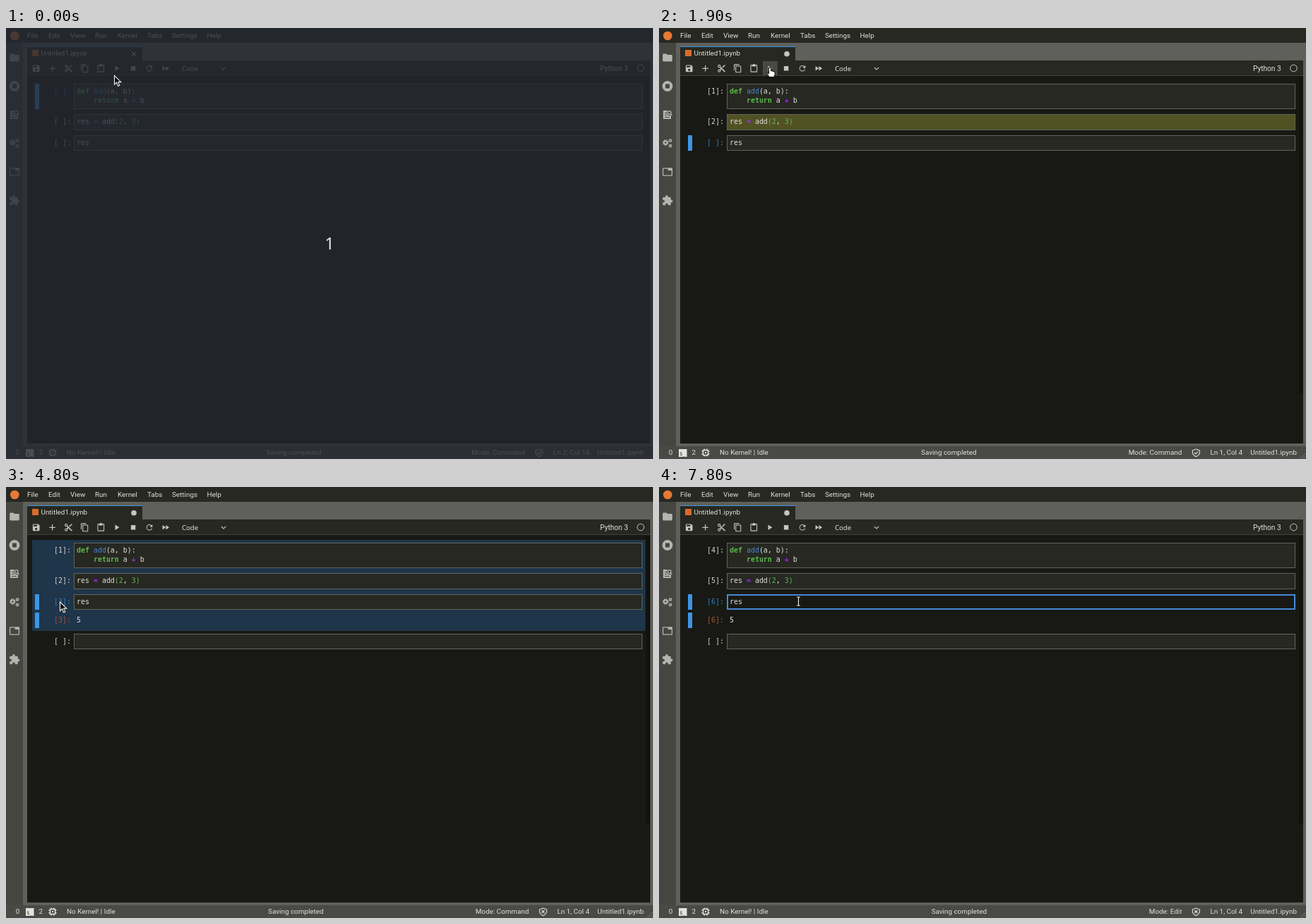
An HTML page with a canvas that plays this animation: 916 by 611 pixels, repeating every 8000 ms.

```html
<!DOCTYPE html>
<html lang="en">
<head>
<meta charset="utf-8">
<title>Notebook cell flash</title>
<style>
  html, body { margin: 0; width: 100%; height: 100%; overflow: hidden; background: #181914; }
  canvas { display: block; }
</style>
</head>
<body>
<canvas id="stage" width="916" height="611"></canvas>
<script>
const ctx = document.getElementById('stage').getContext('2d');
const LOOP = 8000, STEP = 100, FLASH_MS = 600;

const UI = '9.9px Roboto, sans-serif';
const MONO = '9.95px "DejaVu Sans Mono", monospace';
const MONO_BOLD = 'bold ' + MONO;

const C = {
  panel: '#272822', page: '#181914', side: '#454640', strip: '#5f605b', status: '#494a45',
  border: '#62635d', text: '#e0e0dc', icon: '#c6c6c1', blue: '#3d95e5', focus: '#4789d6',
  prompt: '#d6d6d1', activePrompt: '#307fc1', outPrompt: '#a5563c', selected: '#1f3549',
  keyword: '#5cb84c', name: '#4a86cf', operator: '#9a2be8', number: '#5fb552'
};

// 24-unit icon outlines
const ICONS = {
  folder: 'M10 4H4a2 2 0 0 0-2 2v12a2 2 0 0 0 2 2h16a2 2 0 0 0 2-2V8a2 2 0 0 0-2-2h-8z',
  running: 'M12 2a10 10 0 1 0 0 20a10 10 0 0 0 0-20zM8 8h8v8H8z',
  tabs: 'M21 3H3a2 2 0 0 0-2 2v14a2 2 0 0 0 2 2h18a2 2 0 0 0 2-2V5a2 2 0 0 0-2-2zM21 19H3V5h10v4h8z',
  puzzle: 'M20.5 11H19V7a2 2 0 0 0-2-2h-4V3.5a2.5 2.5 0 0 0-5 0V5H4a2 2 0 0 0-2 2v3.8h1.5a2.7 2.7 0 0 1 0 5.4H2V20a2 2 0 0 0 2 2h3.8v-1.5a2.7 2.7 0 0 1 5.4 0V22H17a2 2 0 0 0 2-2v-4h1.5a2.5 2.5 0 0 0 0-5z',
  save: 'M17 3H5a2 2 0 0 0-2 2v14a2 2 0 0 0 2 2h14a2 2 0 0 0 2-2V7zM12 19a3 3 0 1 1 0-6a3 3 0 0 1 0 6zM15 9H5V5h10z',
  add: 'M19 13h-6v6h-2v-6H5v-2h6V5h2v6h6z',
  cut: 'M9.6 7.6A4 4 0 1 0 7.6 9.6L10 12l-2.4 2.4A4 4 0 1 0 9.6 16.4L12 14l7 7h3v-1zM6 8a2 2 0 1 1 0-4a2 2 0 0 1 0 4zM6 20a2 2 0 1 1 0-4a2 2 0 0 1 0 4zM19 3l-6 6 2 2 7-7V3z',
  copy: 'M16 1H4a2 2 0 0 0-2 2v14h2V3h12zM19 5H8a2 2 0 0 0-2 2v14a2 2 0 0 0 2 2h11a2 2 0 0 0 2-2V7a2 2 0 0 0-2-2zM19 21H8V7h11z',
  paste: 'M19 2h-4.2a3 3 0 0 0-5.6 0H5a2 2 0 0 0-2 2v16a2 2 0 0 0 2 2h14a2 2 0 0 0 2-2V4a2 2 0 0 0-2-2zM19 20H5V4h2v3h10V4h2z',
  run: 'M7 5v14l11-7z',
  stop: 'M6 6h12v12H6z',
  restart: 'M17.7 6.3A8 8 0 1 0 19.7 14h-2.1A6 6 0 1 1 12 6a6 6 0 0 1 4.2 1.8L13 11h7V4z',
  runAll: 'M4 18l8.5-6L4 6zM13 6v12l8.5-6z'
};
for (const key in ICONS) ICONS[key] = new Path2D(ICONS[key]);

const ARROW = new Path2D('M0 0V12.6L3 9.8L5.1 14.8L7.3 13.9L5.2 9.1H9.3Z');
const HAND = new Path2D('M-1.5 1.2Q-1.5 0 0 0Q1.5 0 1.5 1.2V4.6L5.4 5.4Q7.2 5.8 7.2 7.4V9.6L5.8 13.6H-.8L-4 9.4Q-4.6 7.6-3 7.6L-1.5 8.6Z');

// [start, x, y, shape]
const POINTER = [
  [0, 153.5, 67.5, 'arrow'], [400, 155.5, 65.5, 'arrow'], [500, 156.5, 63, 'arrow'],
  [600, 157, 59, 'hand'], [700, 157, 56, 'hand'], [3100, 142, 70, 'arrow'],
  [3200, 106.5, 84.5, 'arrow'], [3300, 88, 88, 'arrow'], [3400, 77, 91, 'arrow'],
  [3500, 73, 93, 'arrow'], [3800, 74.5, 131.5, 'arrow'], [4000, 69.5, 145.5, 'arrow'],
  [4300, 67.5, 159, 'arrow'], [4800, 76.5, 163, 'arrow'], [4900, 88, 147, 'arrow'],
  [5000, 118, 113, 'arrow'], [5100, 150, 83, 'arrow'], [5200, 163.5, 76.5, 'arrow'],
  [5400, 161, 64, 'hand'], [5500, 159.5, 55, 'hand'], [6500, 163.5, 64.5, 'arrow'],
  [6600, 187.5, 106.5, 'beam'], [6800, 203, 131, 'beam'], [6900, 200, 113, 'beam'],
  [7100, 204, 130, 'beam'], [7200, 200, 148, 'beam'], [7300, 197.5, 162, 'beam']
];

// [start, active cell, edit mode, cursor position, prompt numbers]
const STATES = [
  [0, 0, false, 'Ln 2, Col 14', ' ', ' ', ' '],
  [900, 1, false, 'Ln 1, Col 16', '1', ' ', ' '],
  [1500, 2, false, 'Ln 1, Col 4', '1', '2', ' '],
  [2400, 3, true, 'Ln 1, Col 1', '1', '2', '3'],
  [3700, 0, false, 'Ln 2, Col 14', '1', '2', '3'],
  [4300, 2, false, 'Ln 1, Col 4', '1', '2', '3'],
  [5700, 3, false, 'Ln 1, Col 1', '4', '5', '6'],
  [7500, 2, true, 'Ln 1, Col 4', '4', '5', '6']
];

const CELLS = [
  { y: 79, h: 36, base: 93.3, runs: [870, 5700] },
  { y: 122, h: 23, base: 136, runs: [1480, 5775] },
  { y: 152, h: 22, base: 165.8, runs: [2410, 5775] },
  { y: 208, h: 22, base: 221.6, runs: [] }
];

const at = (keys, t) => keys.filter(k => k[0] <= t).pop();
const within = (t, from, to) => t >= from && t < to;

function box(x, y, w, h, color) {
  ctx.fillStyle = color;
  ctx.fillRect(x, y, w, h);
}

function disc(x, y, r, color) {
  ctx.fillStyle = color;
  ctx.beginPath();
  ctx.arc(x, y, r, 0, 7);
  ctx.fill();
}

function text(str, x, y, color = C.text, font = UI, align = 'left') {
  ctx.font = font;
  ctx.fillStyle = color;
  ctx.textAlign = align;
  ctx.fillText(str, x, y);
  return ctx.measureText(str).width;
}

function stroke(path, color, width = 1, x = 0, y = 0) {
  ctx.save();
  ctx.translate(x, y);
  ctx.strokeStyle = color;
  ctx.lineWidth = width;
  ctx.stroke(new Path2D(path));
  ctx.restore();
}

function icon(name, x, y, scale, color = C.icon) {
  ctx.save();
  ctx.translate(x, y);
  ctx.scale(scale, scale);
  ctx.translate(-12, -12);
  ctx.fillStyle = color;
  ctx.fill(ICONS[name], 'evenodd');
  ctx.restore();
}

function gear(x, y, r, color) {
  ctx.strokeStyle = color;
  ctx.lineWidth = r * 0.6;
  ctx.beginPath();
  ctx.arc(x, y, r * 0.7, 0, 7);
  ctx.stroke();
  ctx.setLineDash([r * 0.4, r * 0.385]);
  ctx.beginPath();
  ctx.arc(x, y, r, 0, Math.PI * 2);
  ctx.stroke();
  ctx.setLineDash([]);
}

// Parts are [string, color, font]
function code(parts, y) {
  let x = 100;
  for (const [str, color = C.text, font = MONO] of parts) x += text(str, x, y, color, font);
}

function drawFrame() {
  box(0, 0, 916, 611, C.strip);
  box(0, 0, 916, 21, C.panel);
  box(0, 21, 24, 572, C.side);
  box(30, 46, 882, 22, C.panel);
  box(30, 67, 882, 1, '#41423c');
  box(30, 68, 882, 521, C.page);
  box(0, 593, 916, 18, C.status);
  disc(12.3, 11, 6.3, '#e57a35');
  const menu = { File: 30, Edit: 60, View: 91, Run: 126, Kernel: 158, Tabs: 200, Settings: 235, Help: 284.5 };
  for (const name in menu) text(name, menu[name], 13.9);
}

function drawSidebar() {
  const color = '#b4b5b0';
  icon('folder', 12, 42, 0.68, color);
  icon('running', 12, 82.5, 0.74, color);
  box(6, 117, 11, 12, color);
  stroke('M8 120.5H12M8 123.5H11M8 126.5H15', C.side, 1.2);
  disc(15, 120, 4, C.side);
  stroke('M17 120a2.3 2.3 0 1 1-4.6 0a2.3 2.3 0 0 1 4.6 0M16.5 121.7L18.5 124', color, 1.3);
  gear(9.3, 162.5, 3.3, color);
  gear(16, 159.5, 2, color);
  gear(16, 167, 2, color);
  icon('tabs', 12, 204, 0.64, color);
  icon('puzzle', 12, 244.5, 0.68, color);
}

function drawTab(dirty) {
  box(30, 26, 163, 20, C.panel);
  box(30, 26, 163, 1, C.blue);
  box(37, 31, 9, 9, '#d86c2c');
  text('Untitled1.ipynb', 49.5, 38.5);
  if (dirty) disc(181, 36.7, 3.8, C.icon);
  else stroke('M177.8 33.3L184.4 39.9M184.4 33.3L177.8 39.9', C.icon, 1.1);
}

function drawToolbar(hover) {
  if (hover) box(147, 47, 21, 20, '#484943');
  const tools = ['save', 'add', 'cut', 'copy', 'paste', 'run', 'stop', 'restart', 'runAll'];
  tools.forEach((name, i) => icon(name, 42.7 + i * 22.9, 57.3, i === 1 ? 0.6 : 0.54));
  text('Code', 249, 60.5, C.text, '9.6px "Noto Sans", sans-serif');
  stroke('M304.8 55.8L308 59L311.2 55.8', C.icon, 1.2);
  text('Python 3', 841, 61, C.text, '10.1px Roboto, sans-serif');
  stroke('M903.3 57a4.8 4.8 0 1 1-9.6 0a4.8 4.8 0 0 1 9.6 0', C.icon);
}

function drawStatus(edit, position, trusted) {
  const y = 605.2;
  text('0', 13.7, y);
  box(28, 597, 11.5, 11, '#e4e4df');
  text('$_', 29, 605.5, '#40413b', '7px "DejaVu Sans Mono", monospace');
  text('2', 46.5, y);
  stroke('M62.5 598.5h7v7h-7zM64.3 596.5v2M67.7 596.5v2M64.3 605.5v2M67.7 605.5v2M60.5 600.3h2M60.5 603.7h2M69.5 600.3h2M69.5 603.7h2', '#e4e4df', 1.4);
  box(65, 601, 2, 2, '#e4e4df');
  text('No Kernel! | Idle', 86, y);
  text('Untitled1.ipynb', 903, y, C.text, UI, 'right');
  const shield = 826 - text(position, 826, y, C.text, UI, 'right') - 20;
  const mark = trusted ? 'M-2.4 0L-.6 1.8L2.6-1.6' : 'M-2-2L2 2M2-2L-2 2';
  stroke('M0-5L5-3.2V0Q4.6 3.8 0 5.6Q-4.6 3.8-5 0V-3.2Z' + mark, C.text, 1.15, shield, 602);
  const mode = 'Mode: ' + (edit ? 'Edit' : 'Command');
  const left = shield - 20 - text(mode, shield - 20, y, C.text, UI, 'right');
  text('Saving completed', (left + 156) / 2, y, C.text, UI, 'center');
  stroke('M908 610.5L915.5 603M912 610.5L915.5 607', '#85867f', 0.8);
}

function drawPrompt(number, base, color) {
  text(`[${number}]:`, 92, base, color, MONO, 'right');
}

function drawCell(index, t, active, edit, number) {
  const { y, h, base, runs } = CELLS[index];
  const editing = active && edit;
  if (active) box(41, y, 6, h, C.blue);
  box(96, y, 805, h, editing ? C.page : C.panel);
  const start = runs.find(r => within(t, r, r + FLASH_MS));
  if (start !== undefined) {
    box(96, y, 805, h, C.page);
    box(96, y, 805, h, `rgba(208, 214, 70, ${1 - (t - start) / FLASH_MS})`);
  }
  ctx.strokeStyle = editing ? C.focus : C.border;
  ctx.lineWidth = editing ? 2 : 1;
  const inset = ctx.lineWidth / 2;
  ctx.strokeRect(96 + inset, y + inset, 805 - 2 * inset, h - 2 * inset);
  drawPrompt(number, base, active ? C.activePrompt : C.prompt);
}

function drawNotebook(t, [, active, edit, , ...numbers]) {
  const extra = t >= 2400;
  box(906, 69, 6, (extra ? 477 : 518) - 69, '#12130f');
  if (within(t, 4300, 5700)) box(37, 75, 868, 129, C.selected);
  CELLS.forEach((cell, i) => {
    if (i < 3 || extra) drawCell(i, t, i === active, edit, numbers[i] || ' ');
  });
  code([['def', C.keyword, MONO_BOLD], [' '], ['add', C.name], ['(a, b):']], 93.3);
  code([['    return', C.keyword, MONO_BOLD], [' a '], ['+', C.operator, MONO_BOLD], [' b']], 106.3);
  code([['res '], ['=', C.operator, MONO_BOLD], [' add'], ['(2', C.number], [', '], ['3)', C.number]], 136);
  code([['res']], 165.8);
  if (extra) {
    const current = active === 2;
    if (current) box(41, 178, 6, 22, C.blue);
    drawPrompt(numbers[2], 191.8, current ? C.outPrompt : C.prompt);
    code([['5']], 191.8);
  }
  if (within(t, 2400, 3000) || within(t, 3500, 3700)) box(100, 211, 1, 15, '#f4f4f0');
  if (within(t, 7500, 7800)) box(118, 156, 1, 14, '#f4f4f0');
}

function drawPointer(t) {
  const [, x, y, shape] = at(POINTER, t);
  if (shape === 'beam') {
    const beam = 'M-2.5-6H-.6L0-5.4L.6-6H2.5M0-5.4V5.4M-2.5 6H-.6L0 5.4L.6 6H2.5';
    stroke(beam, '#000', 2.8, x, y);
    stroke(beam, '#fff', 1.2, x, y);
    return;
  }
  const hand = shape === 'hand', path = hand ? HAND : ARROW;
  ctx.save();
  ctx.translate(x, y);
  ctx.lineWidth = 1.1;
  ctx.fillStyle = hand ? '#fff' : '#0a0a0a';
  ctx.strokeStyle = hand ? '#111' : '#f2f2f2';
  ctx.fill(path);
  ctx.stroke(path);
  ctx.restore();
}

function drawCountdown() {
  box(0, 0, 916, 611, 'rgba(36, 41, 49, 0.8)');
  text('1', 458, 314, '#eeeeea', '23px "Noto Sans", sans-serif', 'center');
}

function render(now) {
  const t = Math.floor(now % LOOP / STEP) * STEP;
  const state = at(STATES, t);
  drawFrame();
  drawSidebar();
  drawTab(t >= 900);
  drawToolbar(within(t, 600, 3100) || within(t, 5200, 6500));
  drawNotebook(t, state);
  drawStatus(state[2], state[3], t < 2400);
  if (t < 400) drawCountdown();
  drawPointer(t);
  requestAnimationFrame(render);
}
requestAnimationFrame(render);
</script>
</body>
</html>
```
